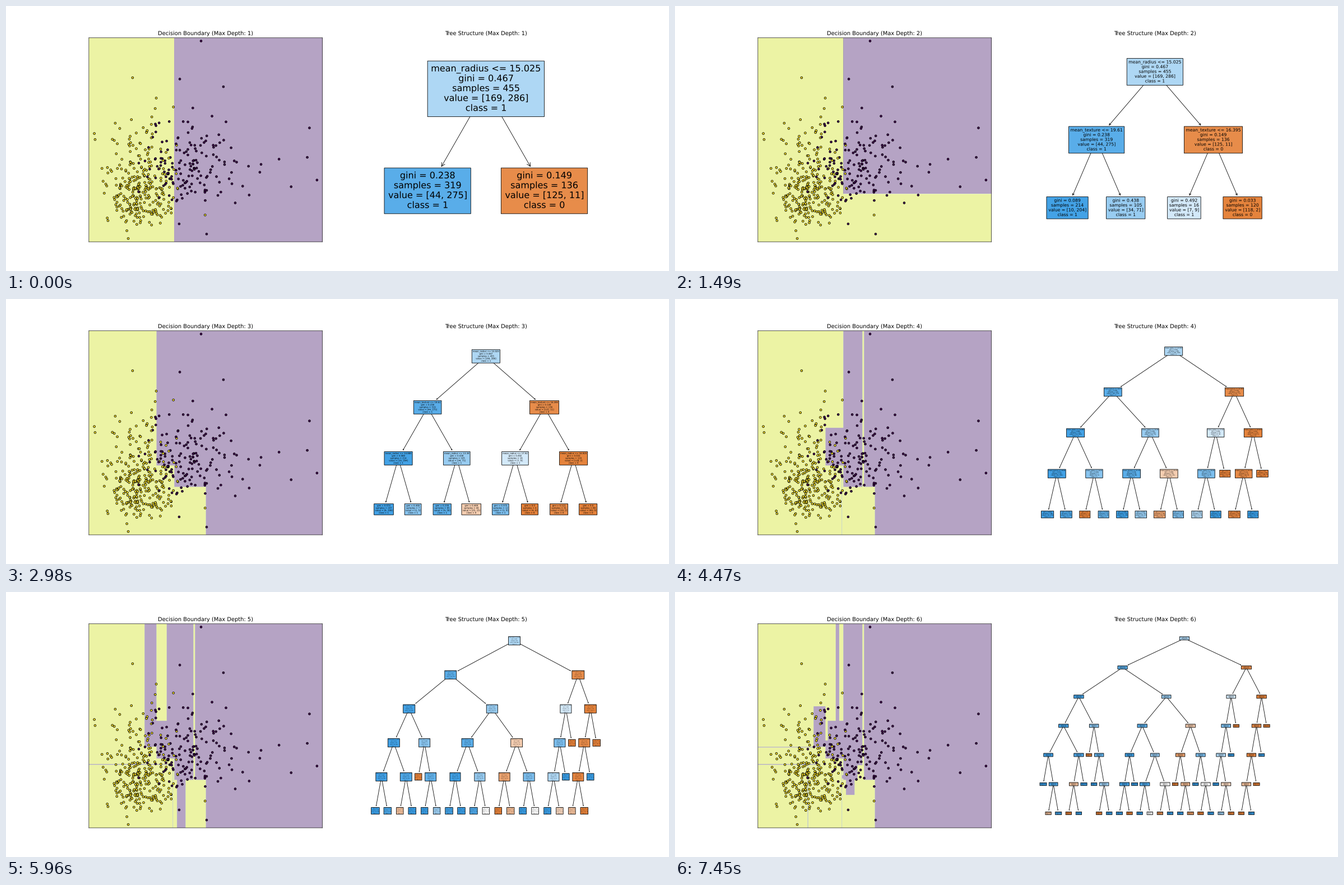
Recreate the animation shown at these times as a matplotlib script. Size 1183 px wide and 473 px high, loop 8 s.

```python
import numpy as np
import matplotlib.pyplot as plt
from matplotlib.animation import FuncAnimation
from matplotlib.patches import FancyArrowPatch, PathPatch, Rectangle
from matplotlib.path import Path
from matplotlib.textpath import TextPath
from matplotlib.transforms import Affine2D

plt.rcParams["font.family"] = "DejaVu Sans"
plt.rcParams["text.hinting"] = "none"

W, H, DPI = 1183, 473, 59.15
STAGE_MS, TICK_MS, LOOP_MS = 1490, 50, 8000
DEPTHS = range(1, 7)
R, T = 0, 1
FEATURES = ("mean_radius", "mean_texture")
X_RANGE, Y_RANGE = (7.191, 28.61), (9.21, 39.78)

# A split is (feature, threshold, left, right); a leaf is (class 0 count, class 1 count).
LOW_TEXTURE = (R, 14.885,
               (T, 18.66,
                (R, 11.75, (0, 110), (R, 11.8, (2, 1), (4, 68))),
                (T, 18.77, (R, 12.9, (2, 0), (0, 1)), (0, 19))),
               (R, 14.91, (1, 0),
                (T, 16.6, (0, 3), (T, 17.1, (1, 0), (0, 2)))))
HIGH_TEXTURE = (R, 13.39,
                (T, 21.35,
                 (R, 12.3, (T, 21.25, (0, 19), (1, 0)), (0, 20)),
                 (R, 12.3, (R, 12.295, (0, 9), (1, 1)), (T, 27.42, (7, 1), (0, 6)))),
                (T, 25.25,
                 (T, 22.3, (9, 0), (R, 13.6, (0, 3), (13, 3))),
                 (R, 14.33, (0, 6), (R, 14.65, (3, 0), (0, 3)))))
LARGE = (T, 16.395,
         (R, 17.92,
          (R, 16.06, (R, 15.27, (0, 3), (T, 14.15, (1, 2), (2, 0))), (0, 4)),
          (4, 0)),
         (R, 16.925,
          (R, 16.78, (T, 18.6, (R, 16.33, (2, 0), (0, 1)), (27, 0)), (0, 1)),
          (89, 0)))
TREE = (R, 15.025, (T, 19.61, LOW_TEXTURE, HIGH_TEXTURE), LARGE)


def counts(node):
    if len(node) == 2:
        return np.array(node)
    return counts(node[2]) + counts(node[3])


def winner(node):
    a, b = counts(node)
    return 0 if a >= b else 1


def thresholds(node, feature):
    if len(node) == 2:
        return []
    own = [node[1]] if node[0] == feature else []
    return own + thresholds(node[2], feature) + thresholds(node[3], feature)


def grid_axis(feature, limits, half_step=0.01):
    """Sample only beside the thresholds: nothing changes in between."""
    cuts = np.array(thresholds(TREE, feature))
    return np.unique(np.concatenate([limits, cuts - half_step, cuts + half_step]))


def predict(node, grid, depth):
    if len(node) == 2 or depth == 0:
        return float(winner(node))
    feature, threshold, left, right = node
    return np.where(grid[feature] <= threshold,
                    predict(left, grid, depth - 1), predict(right, grid, depth - 1))


def fill(node):
    low, high = sorted(counts(node) / counts(node).sum())
    strength = (high - low) / (1 - low)
    hue = np.array([(229, 129, 57), (57, 157, 229)][winner(node)])
    return tuple((strength * hue + (1 - strength) * 255) / 255)


def label(node, is_leaf):
    n = counts(node)
    gini = round(float(1 - np.sum((n / n.sum()) ** 2)), 3)
    lines = [] if is_leaf else [f"{FEATURES[node[0]]} <= {node[1]}"]
    return lines + [f"gini = {gini}", f"samples = {n.sum()}",
                    f"value = [{n[0]}, {n[1]}]", f"class = {winner(node)}"]


def place(node, depth, level=0):
    """Tidy layout: siblings' subtrees stay one unit apart, parents are centred."""
    is_leaf = len(node) == 2 or level == depth
    box = dict(x=0.0, level=level, node=node, parent=None, lines=label(node, is_leaf))
    if is_leaf:
        return [box]
    left, right = (place(child, depth, level + 1) for child in node[2:])

    def edge(side, k, pick):
        return pick(b["x"] for b in side if b["level"] == k)

    deepest = min(max(b["level"] for b in side) for side in (left, right))
    shift = 1 + max(edge(left, k, max) - edge(right, k, min)
                    for k in range(level + 1, deepest + 1))
    for b in right:
        b["x"] += shift
    box["x"] = (left[0]["x"] + right[0]["x"]) / 2
    left[0]["parent"] = right[0]["parent"] = box
    return [box] + left + right


glyphs = {}


def outline(text):
    if text not in glyphs:
        path = TextPath((0, 0), text, size=1)
        glyphs[text] = path, path.get_extents()
    return glyphs[text]


fig = plt.figure(figsize=(W / DPI, H / DPI), dpi=DPI, facecolor="white")
board = fig.add_subplot(1, 2, 1)
board.set_xticks([])
board.set_yticks([])
for spine in board.spines.values():
    spine.set_snap(False)
stage = fig.add_axes([0, 0, 1, 1])
stage.set_xlim(0, W)
stage.set_ylim(0, H)
stage.axis("off")

LEFT, BOTTOM = 0.9 * W - 0.775 * W / 2.2, 0.11 * H
WIDTH, HEIGHT = 0.775 * W / 2.2, 0.77 * H
PAD_X, PAD_Y = 0.94, 0.8
LINE_STEP = {5: 1.88, 6: 0.66}  # tiny type gets uneven line spacing


def draw_tree(depth):
    boxes = place(TREE, depth)
    x_min = min(b["x"] for b in boxes)
    cell = WIDTH / (max(b["x"] for b in boxes) - x_min + 1)
    for b in boxes:
        b["x"] = LEFT + (b["x"] - x_min + 0.5) * cell
        b["y"] = BOTTOM + HEIGHT * (1 - (b["level"] + 0.5) / (depth + 1))
        b["w"] = max(outline(s)[1].width for s in b["lines"]) + PAD_X
    em = cell / max(b["w"] for b in boxes)
    step = LINE_STEP.get(depth, 1.1)

    artists, letters = [], []
    for b in boxes:
        w = b["w"] * em
        h = ((len(b["lines"]) - 1) * step + 1 + PAD_Y) * em
        rect = Rectangle((b["x"] - w / 2, b["y"] - h / 2), w, h, snap=False,
                         fc=fill(b["node"]), ec="black", lw=1, zorder=2)
        artists.append(stage.add_patch(rect))
        if b["parent"]:
            target = (b["parent"]["x"], b["parent"]["y"])
            arrow = FancyArrowPatch((b["x"], b["y"]), target, arrowstyle="<-",
                                    patchA=rect, shrinkA=2, shrinkB=2, color="black",
                                    mutation_scale=em * 72 / DPI, lw=1, zorder=1)
            artists.append(stage.add_patch(arrow))
        baseline = b["y"] + h / 2 - (PAD_Y / 2 + 0.76) * em
        for i, text in enumerate(b["lines"]):
            path, size = outline(text)
            x = b["x"] - em * (size.x0 + size.x1) / 2
            letters.append(path.transformed(
                Affine2D().scale(em).translate(x, baseline - i * step * em)))
    text_patch = PathPatch(Path.make_compound_path(*letters), fc="black", lw=0, zorder=3)
    artists.append(stage.add_patch(text_patch))
    return artists


grid = np.meshgrid(grid_axis(R, X_RANGE), grid_axis(T, Y_RANGE))
groups = {}
for depth in DEPTHS:
    regions = board.contourf(*grid, predict(TREE, grid, depth), alpha=0.4,
                             antialiased=True)
    groups[depth] = [regions] + draw_tree(depth)
board.set_xlim(X_RANGE)
board.set_ylim(Y_RANGE)

rng = np.random.default_rng(7)


def cloud(count, floor, mean, spread, low, high, outliers):
    """Skewed (radius, texture) samples kept between low and high, plus outliers."""
    rise, variance = np.subtract(mean, floor), np.square(spread)
    points = floor + rng.gamma(rise ** 2 / variance, variance / rise, (4 * count, 2))
    inside = np.all((points > low) & (points < high), axis=1)
    return np.vstack([outliers, points[inside][:count - len(outliers)]])


malignant = cloud(169, (9.5, 9), (17.2, 21.5), (2.9, 3.5), (11, 15), (23.5, 29.5),
                  [(17.48, 39.3), (15.53, 33.6), (19.53, 32.45), (27.42, 26.28),
                   (28.11, 18.47), (27.22, 21.87), (25.74, 17.47), (17.99, 10.38),
                   (15.47, 11.9), (24.63, 21.6)])
benign = cloud(286, (0, 9), (12.15, 17.8), (1.75, 3.9), (8.1, 10.8), (15.6, 29.7),
               [(11.2, 33.8), (13.37, 30.75), (7.69, 25.44), (7.76, 24.54),
                (10.8, 9.71), (17.85, 13.23)])
samples = np.vstack([benign, malignant])
colors = np.repeat(["#fde725", "#440154"], [len(benign), len(malignant)])
order = rng.permutation(len(samples))
board.scatter(*samples[order].T, s=20, c=colors[order], edgecolors="black", zorder=4)

board_title = board.set_title("")
tree_title = stage.text(LEFT + WIDTH / 2, BOTTOM + HEIGHT + 6 * DPI / 72, "",
                        size=12, ha="center", va="baseline")


def update(frame):
    current = 1 + (frame * TICK_MS + TICK_MS - 1) // STAGE_MS
    for depth, artists in groups.items():
        for artist in artists:
            artist.set_visible(depth == current)
    board_title.set_text(f"Decision Boundary (Max Depth: {current})")
    tree_title.set_text(f"Tree Structure (Max Depth: {current})")
    return []


animation = FuncAnimation(fig, update, frames=LOOP_MS // TICK_MS, interval=TICK_MS,
                          init_func=lambda: update(0), repeat=True, repeat_delay=0,
                          blit=False)
plt.show()
```
